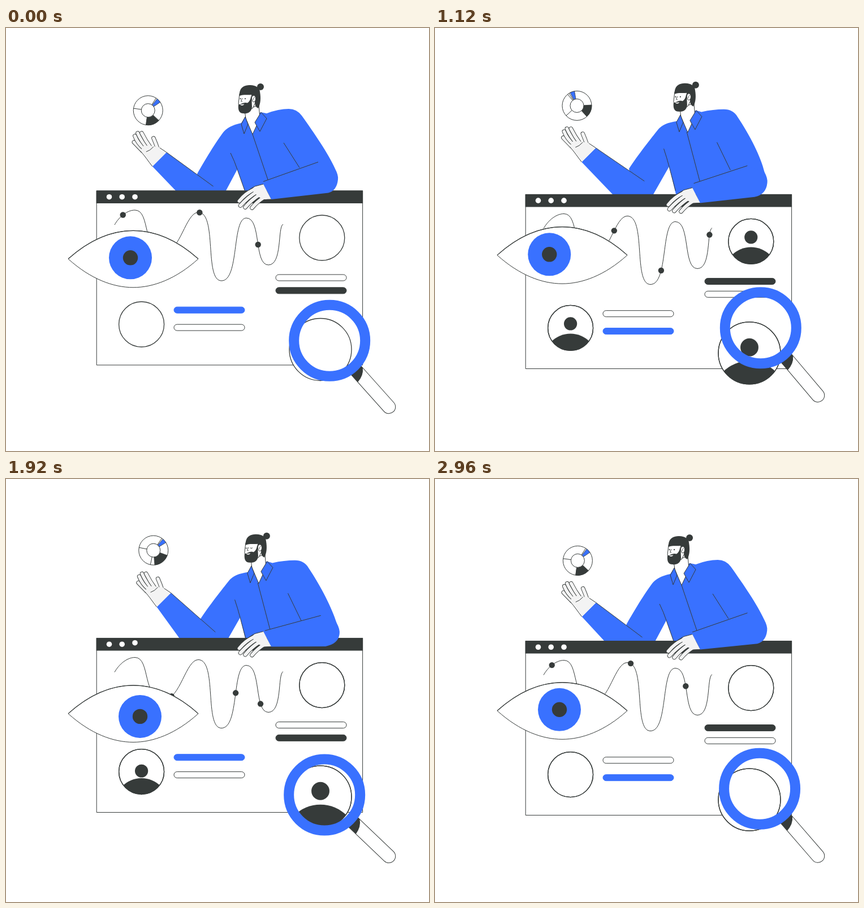
Animation of 748x748 px, one loop 3.04 s. Source, as an HTML page with a canvas:

```html
<!DOCTYPE html>
<html lang="en">
<head>
<meta charset="utf-8">
<title>Data research</title>
<style>
  html, body { margin: 0; width: 100%; height: 100%; overflow: hidden; background: #fff; }
  canvas { display: block; width: 748px; height: 748px; }
</style>
</head>
<body>
<canvas id="stage" width="748" height="748"></canvas>
<script>
const ctx = document.getElementById('stage').getContext('2d');
const LOOP = 3040, STEP = 80, TAU = Math.PI * 2, DEG = Math.PI / 180;
const BLUE = '#3971ff', DARK = '#363b3a', SKIN = '#f3f3f3', WHITE = '#fff';
const KEYS = [0, 320, 800, 1440, 1920, 2400, 2960];

const clamp = u => Math.max(0, Math.min(1, u));
const smooth = u => (u = clamp(u), u * u * (3 - 2 * u));
const backOut = u => (u = clamp(u) - 1, 1 + 2.7 * u ** 3 + 1.7 * u * u);
const wave = (t, mean, amp, peak, period = LOOP) => mean + amp * Math.cos(TAU * (t - peak) / period);

// Cyclic monotone cubic through the given keys
function track(values, times = KEYS) {
  const n = values.length;
  const span = i => ((times[(i + 1) % n] - times[i]) + LOOP) % LOOP;
  const slope = i => (values[(i + 1) % n] - values[i]) / span(i);
  const tangent = i => {
    const a = slope((i + n - 1) % n), b = slope(i);
    return a * b > 0 ? 2 * a * b / (a + b) : 0;
  };
  return t => {
    let i = n - 1;
    while (i > 0 && times[i] > t) i--;
    const j = (i + 1) % n, h = span(i), u = ((t - times[i] + LOOP) % LOOP) / h;
    const u2 = u * u, u3 = u2 * u;
    return values[i] * (2 * u3 - 3 * u2 + 1) + values[j] * (3 * u2 - 2 * u3)
      + h * (tangent(i) * (u3 - 2 * u2 + u) + tangent(j) * (u3 - u2));
  };
}

function paint(path, fill, line, width = 1) {
  if (fill) { ctx.fillStyle = fill; ctx.fill(path); }
  if (line) { ctx.strokeStyle = line; ctx.lineWidth = width; ctx.stroke(path); }
}
const draw = (d, fill, line, width) => paint(new Path2D(d), fill, line, width);

function ellipse(x, y, rx, ry, fill, line, width) {
  const p = new Path2D();
  p.ellipse(x, y, rx, ry, 0, 0, TAU);
  paint(p, fill, line, width);
}
const circle = (x, y, r, fill, line, width) => ellipse(x, y, r, r, fill, line, width);

function pill(x, y, color) {
  const p = new Path2D();
  p.roundRect(x, y - 5.5, 125, 11, 5.5);
  paint(p, color || WHITE, color || DARK);
}

function group(x, y, fn) {
  ctx.save();
  ctx.translate(x, y);
  fn();
  ctx.restore();
}

// Chart line and the three beads that slide on it
const CURVE = 'M192 348C200 334 214 322 228 322C256 322 240 396 280 396C308 396 318 326 340 326'
  + 'C374 326 350 447 381 447C413 447 399 336 425 336C452 336 438 419 464 419C489 419 480 352 490 347';
const rail = document.createElementNS('http://www.w3.org/2000/svg', 'path');
rail.setAttribute('d', CURVE);
function lengthAt([x, y]) {
  let best = 0, near = Infinity;
  for (let len = 0; len <= rail.getTotalLength(); len += .5) {
    const p = rail.getPointAtLength(len), d = Math.hypot(p.x - x, p.y - y);
    if (d < near) { near = d; best = len; }
  }
  return best;
}
const beads = [
  [[207, 331], [237, 325], [275, 396], [342, 326], [292, 390], [237, 324], [207, 331]],
  [[342, 327], [342, 327], [365, 420], [406, 385], [406, 385], [375, 444], [346, 328]],
  [[445, 383], [464, 419], [490, 347], [483, 385], [450, 404], [425, 336], [442, 368]]
].map(spots => track(spots.map(lengthAt)));

// Ring chart angles in degrees
const blueAt = track([-52, -112, -118, -116, -50, -51, -52]);
const darkFrom = track([43, 40, -4, 0, 20, 43, 43]);
const darkTo = track([98, 97, 47, 50, 85, 99, 98]);
const leftSpoke = track([188, 210, 226, 233, 191, 188, 188]);
const lowSpoke = track([98, 117, 135, 138, 102, 99, 98]);

const irisX = track([220, 220, 220, 184.5, 237, 263.5, 220]);
const irisY = track([-2, -2, -2, 0, 5, 1, -2]);
const lidDrop = track([-50, -50, -15, 46, -50, -50], [0, 180, 320, 410, 620, 3000]);

function ringChart(t) {
  const wedge = (a, b, color) => {
    const p = new Path2D();
    p.arc(0, 0, 26, a * DEG, b * DEG);
    p.arc(0, 0, 12, b * DEG, a * DEG, true);
    p.closePath();
    paint(p, color, DARK, .8);
  };
  group(wave(t, 254, 7.2, 2090), wave(t, 137.4, 11.3, 360), () => {
    circle(0, 0, 26, WHITE, DARK);
    for (const a of [leftSpoke(t), lowSpoke(t), blueAt(t) - 5]) {
      const c = Math.cos(a * DEG), s = Math.sin(a * DEG);
      draw(`M${12 * c} ${12 * s}L${26 * c} ${26 * s}`, null, DARK);
    }
    wedge(blueAt(t), blueAt(t) + 18, BLUE);
    wedge(darkFrom(t), darkTo(t), DARK);
    circle(0, 0, 12, WHITE, DARK);
  });
}

function fingers(list, width) {
  ctx.lineCap = 'round';
  for (const d of list) {
    draw(d, null, DARK, width + 1.8);
    draw(d, null, SKIN, width);
  }
  ctx.lineCap = 'butt';
}

function raisedHand() {
  fingers(['M240 216L225.5 201', 'M243 212Q232 203 227 190', 'M249 211Q238 199 232 185',
    'M255 211Q246 199 239 185', 'M268 215Q264 203 260 194'], 5.6);
  draw('M258 244C250 234 246 227 237 217L242 208L253 207L262 209L268 209L283 219Z', SKIN);
  draw('M258 244C250 234 246 227 237 217M271 211L283 219M247 218Q254 216 260 209', null, DARK);
}

function restingHand() {
  fingers(['M438 286Q424 292 412.5 306', 'M443 290Q428 299 414.5 314', 'M448 295Q434 304 423 317',
    'M457 299Q444 307 435 318'], 5.8);
  draw('M455 276L440 280L434 286L441 293L447 299L456 303L469 303Z', SKIN);
  draw('M455 276L440 280Q434 283 429 287M469 303Q461 303 456 304', null, DARK);
}

function head(t) {
  draw('M422 146L424 160L436 188L449 160L447 136Z', WHITE, DARK);
  draw('M423 157L416 170L421 187L428 170Z', BLUE, DARK);
  draw('M451 149L461 160L449 183L440 167Z', BLUE, DARK);
  draw('M413 116L411 134L420 146L436 142L442 130L440 112Z', WHITE, DARK);
  circle(450, 104, 6, DARK);
  draw('M413 120C412 106 420 101 432 101C442 101 449 106 449 113C451 125 450 134 446 142'
    + 'C441 140 440 135 440 130L435 127L434 118C427 119 421 117 413 120Z', DARK);
  draw('M434 119L435 140C434 149 427 152 420 151C412 151 410 145 411 135Q414 136 417 133.5Q422 131 427 132.5Q432 129 433 122Z', DARK);
  ellipse(438, 125, 3.6, 5.8, WHITE, DARK);
  draw('M436.5 128Q437 123 440 122', null, DARK, .8);
  draw('M414 135.5Q418 139 421.5 134.5Z', WHITE);
  if (t >= 1840 && t < 2000) draw('M412 125q2 2 4 0M421 125q2 2 4 0', null, DARK);
  else { circle(414.5, 125, 1.1, DARK); circle(423, 125, 1.1, DARK); }
  draw('M418 124L415.5 129.5L418 130', null, DARK, .9);
}

const elbow = (k, s) => ({ x: 587 - 1.5 * s + 2 * k, y: 265 + 7 * k });

function body(t, k, s) {
  const p = (x, y, dx, dy) => `${x + dx * k} ${y + dy * k} `;
  const hx = wave(t, 3.3, 5.5, 2060), hy = wave(t, -7, 10.7, 360);
  const cuffTop = `${283 + hx} ${219 + hy} `, cuffLow = `${258 + hx} ${244 + hy} `;
  const crook = p(366.5, 280, 4.5, -11), apex = p(409, 250, 6, -6);
  const e = elbow(k, s);

  draw('M' + p(338, 258, 6, -11) + 'C' + p(352, 233, 8, -10) + p(371, 202, 14, -9) + p(383, 186, 14, -8)
    + 'Q' + p(392, 173, 14, -6) + p(416, 168, 14, -4) + 'L' + p(423, 157, 13, -4) + 'L' + p(451, 149, 13, -4)
    + 'L' + p(461, 151, 12, -3) + 'Q' + p(482, 143, 12, 1) + p(500, 143, 13, 1)
    + 'Q' + p(514, 143, 15, 1) + p(523, 155, 14, 2)
    + 'C' + p(545, 186, 14, 4) + p(570, 222, 8, 8) + `${e.x - 5} ${e.y - 16}`
    + `L${e.x - 12} 300L430 310L${apex}L377 310L350 290Z`, BLUE);
  draw(`M${cuffTop}L${crook}L377 310L${p(310, 298, 13, 4)}L${cuffLow}Z`, BLUE);
  draw(`M${cuffTop}L${crook}`, null, DARK);
  draw(`M${p(397, 221, 9, -9)}Q${p(404, 235, 7, -7)}${apex}L${p(422, 287, 4, 1)}`, null, DARK);
  draw(`M${p(436, 188, 11, -5)}L${p(464, 271, 5, 0)}`, null, DARK);
  draw(`M${p(491, 203, 9, -1)}L${p(519, 247, 4, 5)}`, null, DARK);
  group(13 * k, -4 * k, () => head(t));
  group(hx, hy, raisedHand);
}

function foreArm(k, s) {
  const dy = 8.8 * s, e = elbow(k, s);
  const bend = `${552 - 3 * s + 3 * k} ${237 + 6.5 * k + 1.5 * s} `;
  const crease = `${455 + 3 * k} ${271.5 + .5 * dy}`;
  const bx = 570 - 6 * k, by = 291.5 + 7 * k + 2 * s;
  draw(`M${455 + k} ${275 + dy}L${crease}L${bend}L${e.x - 5} ${e.y - 16}Q${e.x + 1} ${e.y - 5} ${e.x} ${e.y + 3}`
    + `Q${e.x - 2} ${by - 4} ${bx} ${by}L${469 - k} ${303 + dy}Z`, BLUE);
  draw(`M${crease}L${bend}`, null, DARK);
  group(0, dy, restingHand);
}

// Portrait that pops in at `start`; head and shoulders drop out separately
function avatar(t, x, y, r, start, headOut, bodyOut) {
  const scale = r / 40, enter = backOut((t - start) / 400);
  const gone = out => 1 - enter + smooth((t - out) / 300);
  const stretch = 1.4 * Math.max(0, enter - 1);
  circle(x, y, r, WHITE, DARK, 1.3);
  if (t < start) return;
  ctx.save();
  ctx.beginPath();
  ctx.arc(x, y, r, 0, TAU);
  ctx.clip();
  circle(x, y + scale * (58 + 32 * gone(bodyOut)), 48 * scale, DARK);
  ellipse(x, y + scale * (-7.5 + 60 * gone(headOut)), 11.6 * scale * (1 - stretch), 11.6 * scale * (1 + stretch), DARK);
  ctx.restore();
  circle(x, y, r, null, DARK, 1.3);
}

function panel() {
  const p = new Path2D();
  p.rect(160.2, 288, 470.4, 308);
  paint(p, WHITE, DARK);
  ctx.fillStyle = DARK;
  ctx.fillRect(159.7, 287.4, 471.4, 22.6);
}

function content(t) {
  [182.5, 205.2, 228].forEach((x, i) => {
    const hop = peak => 3 * (1 - smooth(Math.abs(t - peak - 170 * i) / 160));
    circle(x, 298.7 - hop(330) - hop(1540), 4.8, WHITE);
  });
  draw(CURVE, null, DARK);
  for (const bead of beads) {
    const at = rail.getPointAtLength(bead(t));
    circle(at.x, at.y, 5.2, DARK);
  }
  const swapped = Math.floor(t / 760) % 2 === 1;
  pill(477, 441.5, swapped && DARK);
  pill(477, 464.3, !swapped && DARK);
  pill(297, 498.7, !swapped && BLUE);
  pill(297, 529.6, swapped && BLUE);
  avatar(t, 558.8, 371, 40, 240, 1560, 1560);
  avatar(t, 239.6, 524, 40, 380, 1860, 1880);
  avatar(t, 556, 568.5, 55, 620, 2300, 2100);
}

function eye(t, s) {
  const upper = 'M110 0C150 -36 190 -50 225 -50S300 -36 340 0';
  group(0, 408.3 - 9 * s, () => {
    draw(upper + 'C300 36 260 50.5 225 50.5S150 36 110 0Z', WHITE, DARK);
    circle(irisX(t), irisY(t), 38, BLUE);
    circle(irisX(t), irisY(t), 13.2, DARK);
    const m = lidDrop(t);
    if (m > -49.5) draw(`${upper}C300 ${m * .72} 260 ${m} 225 ${m}S150 ${m * .72} 110 0Z`, WHITE, DARK);
    draw(upper, null, DARK, 1.2);
  });
}

function lens(t) {
  const half = LOOP / 2;
  const x = wave(t, 569.7, -6.8, 470, half), y = wave(t, 545, 16.2, 258, half);
  const dx = 677 - x, dy = wave(t, 659.3, 13.8, 165, half) - y;
  const end = Math.hypot(dx, dy);
  group(x, y, () => {
    ctx.save();
    ctx.rotate(Math.atan2(dy, dx));
    draw(`M66 -11.7H${end}A11.7 11.7 0 0 1 ${end} 11.7H66Z`, WHITE, DARK);
    draw('M66 -11.7H75Q86 -4 88 11.7H66Z', DARK);
    ctx.restore();
    circle(0, 0, 63, null, BLUE, 18);
  });
}

function render(t) {
  const s = Math.sin(TAU * t / LOOP), k = (1 - Math.cos(TAU * t / LOOP)) / 2;
  ctx.fillStyle = WHITE;
  ctx.fillRect(0, 0, 748, 748);
  ctx.lineJoin = 'round';
  ringChart(t);
  body(t, k, s);
  group(0, 8.8 * s, () => { panel(); content(t); });
  foreArm(k, s);
  eye(t, s);
  lens(t);
}

const begin = performance.now();
function tick() {
  const t = (performance.now() - begin) % LOOP;
  render(Math.floor(t / STEP) * STEP);
  requestAnimationFrame(tick);
}
tick();
</script>
</body>
</html>
```
